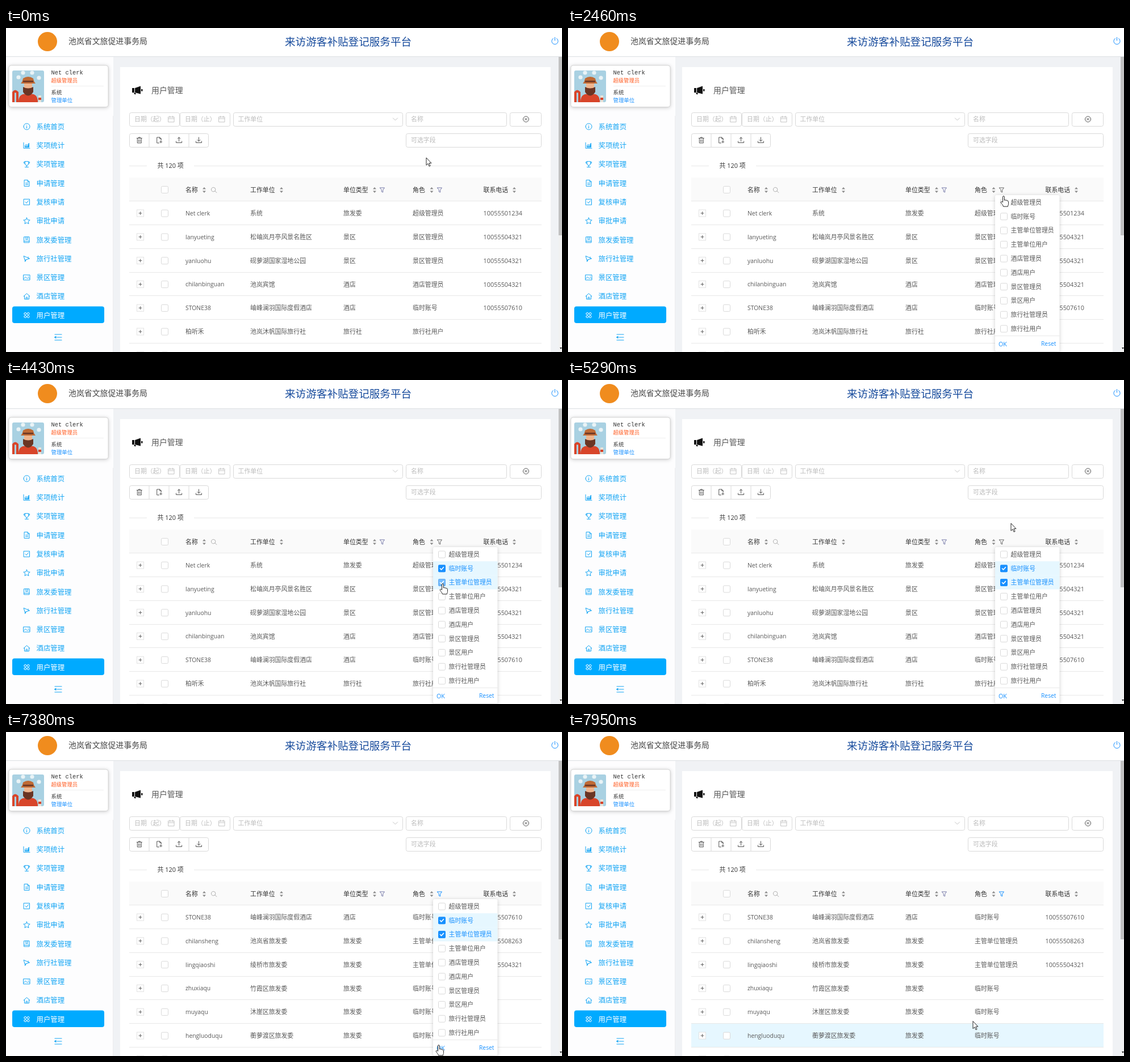
An HTML page that plays this animation: 979 by 572 pixels, repeating every 8000 ms.

```html
<!DOCTYPE html>
<html lang="zh-CN">
<head>
<meta charset="utf-8">
<title>用户管理</title>
<style>
html, body { margin: 0; width: 100%; height: 100%; overflow: hidden; background: #fff; }
svg { display: block; width: 979px; height: 572px; }
text { font-family: "Open Sans", "Noto Sans CJK SC", "Noto Sans CJK", sans-serif; white-space: pre; }
.mono { font-family: "Liberation Mono", monospace; }
.line { fill: none; stroke: currentColor; stroke-linecap: round; stroke-linejoin: round; }
.shadow { filter: drop-shadow(0 1px 3px rgba(0,0,0,.2)); }
</style>
</head>
<body>
<svg id="stage" viewBox="0 0 979 572"></svg>
<script>
const LOOP = 8000, OPEN = 1540, FILTERED = 7380, CLOSE = 7440, FADE = 200;
const BLUE = '#1890ff', TINT = '#e6f7ff', GREY = '#595959', DARK = '#333';
const ROW = 41.8, ITEM = 24.75, MENU_TOP = 295.3;

const text = (x, y, s, size = 10.9, fill = GREY, extra = '') =>
  `<text x="${x}" y="${y + size * .38}" font-size="${size}" fill="${fill}" ${extra}>${s}</text>`;
const rect = (x, y, w, h, fill, extra = '') =>
  `<rect x="${x}" y="${y}" width="${w}" height="${h}" fill="${fill}" ${extra}/>`;
const field = (x, y, w, h = 24) => rect(x + .5, y + .5, w - 1, h, '#fff', 'rx="3" stroke="#d9d9d9"');
const rule = (x1, x2, y) => rect(x1, y, x2 - x1, 1, '#e8e8e8');
const box = (x, y) => rect(x - 6, y - 6, 12, 12, '#fff', 'rx="2" stroke="#d9d9d9"');
const icon = (x, y, d, color, width = 1) =>
  `<path class="line" transform="translate(${x} ${y})" d="${d}" color="${color}" stroke-width="${width}"/>`;
const solid = (x, y, d, fill, extra = '') =>
  `<path transform="translate(${x} ${y})" d="${d}" fill="${fill}" ${extra}/>`;
const circle = (x, y, r, fill) => `<circle cx="${x}" cy="${y}" r="${r}" fill="${fill}"/>`;
const ring = r => `M${-r} 0a${r} ${r} 0 1 0 ${2 * r} 0a${r} ${r} 0 1 0 ${-2 * r} 0`;

const FUNNEL = 'M-4-4H4L1.2 0V4L-1.2 3V0Z';
const CALENDAR = 'M-5-4H5V5H-5ZM-5-1H5M-2.5-5.5V-3M2.5-5.5V-3';

function header() {
  return rect(0, 0, 979, 50, '#fff') + rect(0, 50, 979, 1, '#dcdfe3')
    + circle(73, 24, 17, '#f08c1e')
    + text(110, 23, '池岚省文旅促进事务局', 13.9, '#444')
    + text(491, 24, '来访游客补贴登记服务平台', 18.6, '#164a9c')
    + icon(966.5, 23, 'M-3-4.6A5.6 5.6 0 1 0 3-4.6M0-6.5V-1', BLUE);
}

function avatar() {
  const bubbles = [[22, 87], [30, 79], [46, 79], [58, 88]];
  return rect(11, 75, 56, 56, '#a9d1e2', 'rx="3"')
    + bubbles.map(([x, y]) => circle(x, y, 3.6, '#e9f3f6')).join('')
    + solid(0, 0, 'M22 131C22 117 30 116 39 116S56 117 56 131Z', '#d8452a')
    + solid(0, 0, 'M11 131V113Q16 106 22 113V131H18V115Q16 113 15 115V131Z', '#d8452a')
    + rect(32, 96, 14, 14, '#efb58e', 'rx="3"')
    + solid(0, 0, 'M30 104Q39 109 48 104V113Q39 126 30 113Z', '#6a3524')
    + solid(0, 0, 'M26 98Q29 95 30 89Q39 83 48 89Q49 95 52 98Z', '#bf6a35')
    + rect(30, 93, 18, 2.5, '#6a3524')
    + rect(57, 119, 5, 12, '#e9e2d8') + rect(57, 123, 5, 4, '#d8452a');
}

function sidebar() {
  const items = [
    ['系统首页', ring(5.5) + 'M0-2.8V-2.6M0-.5V3'],
    ['奖项统计', 'M-5.5-5V5H5.5M-3 3V0L-1-2L1 0L4-4V3ZM-2 2H3M-1 0V2M1 1H3M3-1V2'],
    ['奖项管理', 'M-3-5H3V-1A3 3 0 0 1-3-1ZM-3-4H-5V-2L-3-1M3-4H5V-2L3-1M0 2V5M-3 5H3'],
    ['申请管理', 'M-4-5.5H1.5L4.5-2.5V5.5H-4ZM1.5-5.5V-2.5H4.5M-2 0H2.5M-2 2.5H2.5'],
    ['复核申请', 'M-5-5H5V5H-5ZM-2.5 0L-.5 2L3-2.5'],
    ['审批申请', 'M0-5.5L1.7-1.8L5.7-1.4L2.7 1.3L3.5 5.2L0 3.2L-3.5 5.2L-2.7 1.3L-5.7-1.4L-1.7-1.8Z'],
    ['旅发委管理', 'M-4.5-5H4.5V5H-4.5ZM-1.5-5V0L0-1L1.5 0V-5M-4.5 2.5H4.5'],
    ['旅行社管理', 'M-5-4.5L5 0L-3 2.5ZM-3 2.5V5.5L-1 2M2.5-3V-1'],
    ['景区管理', 'M-5.5-4.5H5.5V4.5H-5.5ZM-5 2L-2-1L1 2L3 0L5 2M2.5-2.3H3'],
    ['酒店管理', 'M-5.5 0L0-5L5.5 0M-4-1V5H4V-1M-1.2 5V1.5H1.2V5'],
    ['用户管理', [[-2.6, -2.6], [2.6, -2.6], [-2.6, 2.6], [2.6, 2.6]]
      .map(([x, y]) => `M${x - 2} ${y}a2 2 0 1 0 4 0a2 2 0 1 0-4 0`).join('')]
  ];
  return rect(0, 51, 189, 521, '#fdfdfe') + rect(188, 155, 1, 417, '#ececef')
    + rect(5, 66, 175, 73.5, '#fff', 'rx="4" stroke="#ccc" stroke-width=".8" class="shadow"')
    + avatar()
    + text(79.5, 78, 'Net clerk', 10.4, DARK, 'class="mono"')
    + text(79.5, 92, '超级管理员', 9.3, '#ff5a1f')
    + rect(80, 102, 92, 1, '#efefef')
    + text(79.5, 113, '系统', 9.4, DARK)
    + text(79.5, 127, '管理单位', 9.4, BLUE)
    + rect(11, 491.5, 162, 29.5, '#00aaff', 'rx="4"')
    + items.map(([label, d], i) => {
      const y = 174 + 33.3 * i, color = i === 10 ? '#fff' : '#14a5f4';
      return icon(36.5, y, d, color) + text(53.5, y, label, 12.4, color);
    }).join('')
    + icon(92, 546, 'M-6-5H6M-2 0H6M-6 5H6M-6.5 0L-4-1.5V1.5Z', '#14a5f4', 1.2);
}

function toolbar() {
  const hint = (x, y, s) => text(x, y, s, 10.9, '#bcbcbc');
  const buttons = [
    'M-4.5-3.5H4.5M-3.5-3V5H3.5V-3M-1.5-3.5V-5H1.5V-3.5M-1.2-1V3M1.2-1V3',
    'M0 5H-4V-5H1L3.5-2.5V0M1-5V-2.5H3.5M3 1V5M1 3H5',
    'M-5 2V4.5H5V2M0 2V-5M-2.5-2.5L0-5L2.5-2.5',
    'M-5 2V4.5H5V2M0 2V-5M-2.5-.5L0 2L2.5-.5'
  ];
  return solid(222, 110, 'M0-4H4V4H0ZM5-4L15-7.5V6.5L5 4ZM3 4.5H6L7 7H4ZM16-2H18.5V1.5H16Z', '#111')
    + text(256, 110, '用户管理', 13.9, '#555')
    + field(217, 149, 89) + hint(226, 161, '日期（起）') + icon(291, 161, CALENDAR, '#c4c4c4')
    + field(306, 149, 89) + hint(315, 161, '日期（止）') + icon(380, 161, CALENDAR, '#c4c4c4')
    + field(400, 149, 299) + hint(408.5, 161, '工作单位') + icon(685.5, 161, 'M-4-2L0 2L4-2', '#c4c4c4')
    + field(704, 149, 178) + hint(713, 161, '名称')
    + field(887, 149, 56) + icon(915.5, 161, ring(5) + 'M-1.8-1.8L1.8 1.8M1.8-1.8L-1.8 1.8', '#555')
    + field(217, 186, 140)
    + buttons.map((d, i) => (i ? rect(217 + 35 * i - .5, 186, 1, 24, '#d9d9d9') : '')
      + icon(234.8 + 34.9 * i, 198, d, '#555')).join('')
    + field(704, 186, 239) + hint(713, 198, '可选字段')
    + rule(217, 248, 243) + rule(331, 943, 243)
    + text(266.5, 243, '共 120 项', 10.9, DARK, 'font-weight="500"');
}

function tableFrame() {
  const heads = [[316, '名称', 349], [430, '工作单位', 485], [594, '单位类型', 649],
    [716, '角色', 749.5], [840.5, '联系电话', 895]];
  let out = rect(217, 264, 726, 41, '#fafafa') + rule(217, 943, 305) + box(279.5, 285.5)
    + heads.map(([x, s, sx]) => text(x, 285.5, s, 10.9, DARK, 'font-weight="500"')
      + solid(sx, 286, 'M-3-1.5L0-5L3-1.5ZM-3 1.5L0 5L3 1.5Z', '#8c8c8c')).join('')
    + icon(366, 286, 'M-4.5-.8a3.7 3.7 0 1 0 7.4 0a3.7 3.7 0 1 0-7.4 0M2.2 2L5 4.8', '#b0b0b0')
    + icon(662.5, 286, FUNNEL, '#7579a8')
    + `<g id="funnel">${icon(763.5, 286, FUNNEL, 'inherit')}</g>`;
  for (let i = 0; i < 7; i++) {
    const y = 327 + ROW * i;
    out += rect(230.5, y - 6, 12, 12, '#fff', 'stroke="#e2e2e2"')
      + icon(236.5, y, 'M-2.5 0H2.5M0-2.5V2.5', '#666') + box(279.5, y + .2)
      + rule(217, 943, Math.round(347 + ROW * i));
  }
  return out;
}

const rowsText = rows => rows.map((cells, i) => cells.map((s, c) =>
  text([316, 430, 594, 716, 840.5][c], 327 + ROW * i, s,
    c === 0 && /^[a-z]/i.test(s) ? 10.4 : 10.9)).join('')).join('');

const allUsers = [
  ['Net clerk', '系统', '旅发委', '超级管理员', '10055501234'],
  ['lanyueting', '松岫岚月亭风景名胜区', '景区', '景区管理员', '10055504321'],
  ['yanluohu', '砚萝湖国家湿地公园', '景区', '景区管理员', '10055504321'],
  ['chilanbinguan', '池岚宾馆', '酒店', '酒店管理员', '10055504321'],
  ['STONE38', '岫峰澜羽国际度假酒店', '酒店', '临时账号', '10055507610'],
  ['柏听禾', '池岚沐帆国际旅行社', '旅行社', '旅行社用户', '']
];
const someUsers = [
  allUsers[4],
  ['chilansheng', '池岚省旅发委', '旅发委', '主管单位管理员', '10055508263'],
  ['lingqiaoshi', '绫桥市旅发委', '旅发委', '主管单位管理员', '10055504321'],
  ['zhuxiaqu', '竹霞区旅发委', '旅发委', '临时账号', ''],
  ['muyaqu', '沐崖区旅发委', '旅发委', '临时账号', ''],
  ['hengluoduqu', '蘅萝渡区旅发委', '旅发委', '临时账号', '']
];

const roles = ['超级管理员', '临时账号', '主管单位管理员', '主管单位用户', '酒店管理员',
  '酒店用户', '景区管理员', '景区用户', '旅行社管理员', '旅行社用户'];
const checkedAt = { 1: 3330, 2: 4290 };

function menu() {
  return rect(752, 295, 113.5, 276, '#fff', 'rx="3" class="shadow"')
    + roles.map((role, i) => {
      const y = 307.7 + 24.78 * i;
      return `<g class="item">${rect(752, MENU_TOP + ITEM * i, 113.5, ITEM, TINT)}${box(767.5, y + .3)}`
        + `<g>${rect(761, y - 6.2, 13, 13, BLUE, 'rx="2"')}${icon(767.5, y + .3, 'M-3 0L-1 2.2L3-2.2', '#fff', 1.6)}</g>`
        + text(779.5, y, role) + '</g>';
    }).join('')
    + rule(752, 865.5, 543)
    + text(758, 557.5, 'OK', 10.7, BLUE) + text(833, 557.5, 'Reset', 10.3, BLUE);
}

const $ = id => document.getElementById(id);
$('stage').innerHTML = rect(0, 0, 979, 572, '#f0f2f5') + header() + sidebar()
  + rect(201, 69, 758, 503, '#fff')
  + rect(973, 51, 6, 521, '#f1f1f1') + rect(973, 51, 6, 315, '#c1c1c1')
  + solid(975, 564, 'M0 0H4L2 3Z', '#222')
  + toolbar()
  + rect(217, 515, 726, 41, TINT, 'id="hoverRow"')
  + tableFrame()
  + `<g id="before">${rowsText(allUsers)}</g><g id="after">${rowsText(someUsers)}</g>`
  + `<g id="menu">${menu()}</g>`
  + solid(0, 0, 'M0 0V13.2L3 10.4L5.1 15.2L7.1 14.3L5 9.6H9Z', '#fff', 'id="arrow" stroke="#111" stroke-width=".9"')
  + solid(0, 0, 'M-1.5 10.5V1A1.4 1.4 0 0 1 1.3 1V7.2C1.6 6 4 6.2 4 7.6C4.6 6.6 6.6 7 6.6 8.4C7.2 7.6 8.5 8 8.5 9.4V13.5C8.5 15.5 7.4 16 7.4 18H-.5C-.5 16-3.6 13.4-4.8 10.8C-5.2 9.4-3.2 8.8-2.4 9.8Z',
    '#fff', 'id="hand" stroke="#111" stroke-width=".9"');

// Pointer hotspot: time, x, y
const path = [[0, 740, 229], [290, 740, 229], [830, 763, 287], [2459, 763, 287], [2460, 767, 297],
  [2720, 783, 338], [3600, 783, 338], [3730, 776, 363], [3800, 774, 364], [4040, 769, 360],
  [4950, 769, 360], [5290, 780, 253], [5530, 780, 253], [5670, 785, 259], [5880, 785, 259],
  [6620, 763, 553], [6740, 763, 553], [6880, 762, 553], [7560, 762, 553], [7940, 713, 510.5], [LOOP, 713, 510.5]];

const clamp = v => Math.min(1, Math.max(0, v));

function pointer(t) {
  t = Math.max(0, t);
  const i = path.findIndex(p => p[0] > t), [t0, x0, y0] = path[i - 1], [t1, x1, y1] = path[i];
  const k = (t - t0) / (t1 - t0);
  return [x0 + (x1 - x0) * k, y0 + (y1 - y0) * k];
}

function menuAmount(t) {
  if (t < OPEN) return 0;
  if (t < CLOSE) return 1 - (1 - clamp((t - OPEN + 52) / FADE)) ** 5;
  return 1 - clamp((t - CLOSE) / FADE) ** 4;
}

const show = (el, on) => el.setAttribute('visibility', on ? 'visible' : 'hidden');
const items = [...document.querySelectorAll('.item')];

function draw(t) {
  const filtered = t >= FILTERED, amount = menuAmount(t);
  $('before').style.display = filtered ? 'none' : '';
  $('after').style.display = filtered ? '' : 'none';
  $('hoverRow').setAttribute('opacity', clamp((t - CLOSE - 150) / 250));
  $('funnel').firstChild.setAttribute('color', filtered ? BLUE : t >= 970 ? '#666' : '#7579a8');

  const scale = .8 + .2 * amount;
  $('menu').style.display = amount ? '' : 'none';
  $('menu').setAttribute('opacity', amount);
  $('menu').setAttribute('transform', `translate(0 ${295 * (1 - scale)}) scale(1 ${scale})`);

  const over = Math.floor((pointer(t - 60)[1] - MENU_TOP) / ITEM);
  items.forEach((item, i) => {
    const [back, , check, label] = item.children;
    const on = i in checkedAt ? clamp((t - checkedAt[i] + 40) / 300) : 0;
    back.setAttribute('opacity', on || over === i ? 1 : 0);
    check.setAttribute('opacity', on);
    label.setAttribute('fill', on ? BLUE : GREY);
  });

  const [x, y] = pointer(t), pointing = y > 281 && t < CLOSE + FADE;
  for (const [id, on] of [['arrow', !pointing], ['hand', pointing]]) {
    show($(id), on);
    $(id).setAttribute('transform', `translate(${x} ${y})`);
  }
}

function tick() {
  draw(performance.now() % LOOP);
  requestAnimationFrame(tick);
}
tick();
</script>
</body>
</html>
```
